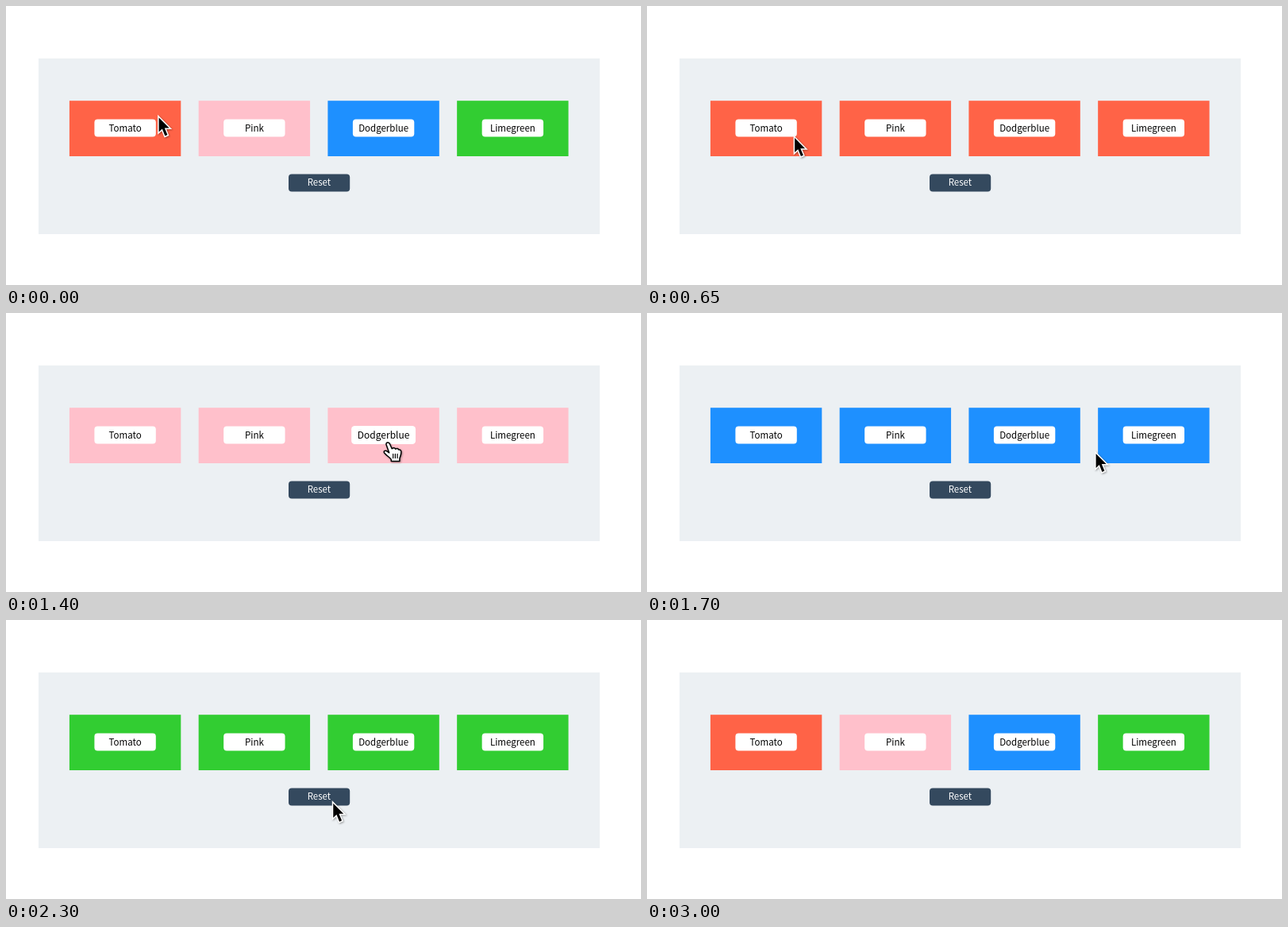
An HTML page for the animation above (3.25 s loop, 800x351 px).

```html
<!DOCTYPE html>
<html lang="ko">
<head>
<meta charset="utf-8">
<title>Colour buttons</title>
<style>
  html, body { margin: 0; width: 100%; height: 100%; overflow: hidden; background: #fff; }
  svg { display: block; width: 100%; height: 100%; }
  text { font: 11.5px "Noto Sans CJK KR", "Noto Sans CJK", "Noto Sans CJK JP", "Noto Sans", sans-serif; }
  .label { text-anchor: middle; }
  #reset { fill: #fff; font-weight: 500; }
  #tip text { fill: #fff; font-size: 8.9px; font-weight: 500; }
  #tip, #cursor { filter: drop-shadow(1px 1.5px 1px rgba(0, 0, 0, .35)); }
</style>
</head>
<body>
<svg viewBox="0 0 800 351" xmlns="http://www.w3.org/2000/svg">
  <rect x="41" y="66" width="707" height="221" fill="#ecf0f3"/>
  <g id="cards"></g>
  <rect x="356" y="211.4" width="77.2" height="22" rx="4" fill="#34495e"/>
  <text id="reset" class="label" x="394.4" y="226.4">Reset</text>
  <g id="tip">
    <rect x="391.5" y="244.5" width="268" height="14" rx="1" fill="#555"/>
    <text x="394" y="254.5">Reset :</text>
    <text x="421" y="254.5">다시 놓다, 눈금을 고쳐 놓다, 다시 세트하다, 다시 짜다, 바꿔 박다</text>
  </g>
  <g id="cursor">
    <path id="arrow" d="M.6 2.4V20.4L4.8 16.6L8.4 25.4L11.4 24.1L7.8 15.6H13.6Z"
      fill="#000" stroke="#fff" stroke-width="3" paint-order="stroke"/>
    <g id="hand" transform="translate(-1 .8)" stroke="#000" stroke-linecap="round" stroke-linejoin="round">
      <path d="M-.9 3C-2 .2 2 -1 3.3 1.5L6.2 8C7.8 6.3 10 6.8 10.7 8.3C12.2 7 14.3 7.8 14.8 9.3C16.7 8.6 17.8 10 17.9 12C18 16 16.4 17.8 15.9 20.5V23.8H5.3V21.5C3.5 18.8 -.2 17 -3.4 13.2C-5 10.8 -1.8 9.3 .6 11.6L2.7 13Z"
        fill="#fff" stroke-width="1.5"/>
      <path d="M7.7 14.6V19.6M10.4 14.6V19.6M13.1 14.6V19.6" fill="none" stroke-width="1.2"/>
    </g>
  </g>
</svg>
<script>
const LOOP = 3250, STEP = 50, GROWTH = 0.045, RAMP = 100;
const $ = id => document.getElementById(id);

// The pointer rests at each stop from arrive to leave; dip is how far the way there sags.
const options = [
  { name: "Tomato", color: "#ff6347", x: 163, y: 163, arrive: 400, leave: 550, dip: 36 },
  { name: "Pink", color: "#ffc0cb", x: 307, y: 163, arrive: 950, leave: 1000, dip: 3 },
  { name: "Dodgerblue", color: "#1e90ff", x: 481, y: 162, arrive: 1300, leave: 1550, dip: 36 },
  { name: "Limegreen", color: "#32cd32", x: 649, y: 159, arrive: 1850, leave: 1950, dip: 14 }
];
const reset = { x: 401, y: 231, arrive: 2350, leave: 2700, dip: 20 };
const targets = [...options, reset];
const stops = [
  { x: 192, y: 138, leave: 0 },
  ...targets,
  { x: 387, y: -40, arrive: 3000, leave: LOOP, dip: 0 }
];
const resetClick = reset.arrive + RAMP;

$("cards").innerHTML = options.map(({ name, color }, i) => `
  <g transform="translate(${79.9 + i * 162.75} 119.2)">
    <rect class="card" width="140.4" height="69.8" fill="${color}"/>
    <g class="button">
      <rect x="-38.7" y="-11" width="77.4" height="22" rx="4" fill="#fff"/>
      <text class="label" y="4">${name}</text>
    </g>
  </g>`).join("");
const cards = document.querySelectorAll(".card");
const buttons = document.querySelectorAll(".button");

const clamp = v => Math.max(0, Math.min(1, v));
const smooth = k => k * k * (3 - 2 * k);
const show = (el, on) => el.setAttribute("visibility", on ? "visible" : "hidden");

function pointerAt(t) {
  const next = Math.max(1, stops.findIndex(s => t <= s.leave));
  const a = stops[next - 1], b = stops[next];
  const k = smooth(clamp((t - a.leave) / (b.arrive - a.leave)));
  const sag = b.dip * Math.sin(Math.PI * k) ** 2;
  return [a.x + (b.x - a.x) * k, a.y + (b.y - a.y) * k + sag];
}

function draw(t) {
  const chosen = t < resetClick && options.filter(o => t >= o.leave).pop();
  options.forEach((option, i) => {
    const hover = clamp(Math.min((t - option.arrive) / RAMP, 1 - (t - option.leave) / RAMP));
    cards[i].setAttribute("fill", (chosen || option).color);
    buttons[i].setAttribute("transform", `translate(70.2 34.4) scale(${1 + GROWTH * hover})`);
  });
  const pointing = targets.some(s => t >= s.arrive && t <= s.leave);
  show($("hand"), pointing);
  show($("arrow"), !pointing);
  show($("tip"), t > resetClick && t <= reset.leave + STEP);
  $("cursor").setAttribute("transform", `translate(${pointerAt(t)})`);
}

const start = performance.now();
function tick() {
  const t = (performance.now() - start) % LOOP;
  draw(Math.floor(t / STEP) * STEP);
  requestAnimationFrame(tick);
}
tick();
</script>
</body>
</html>
```
